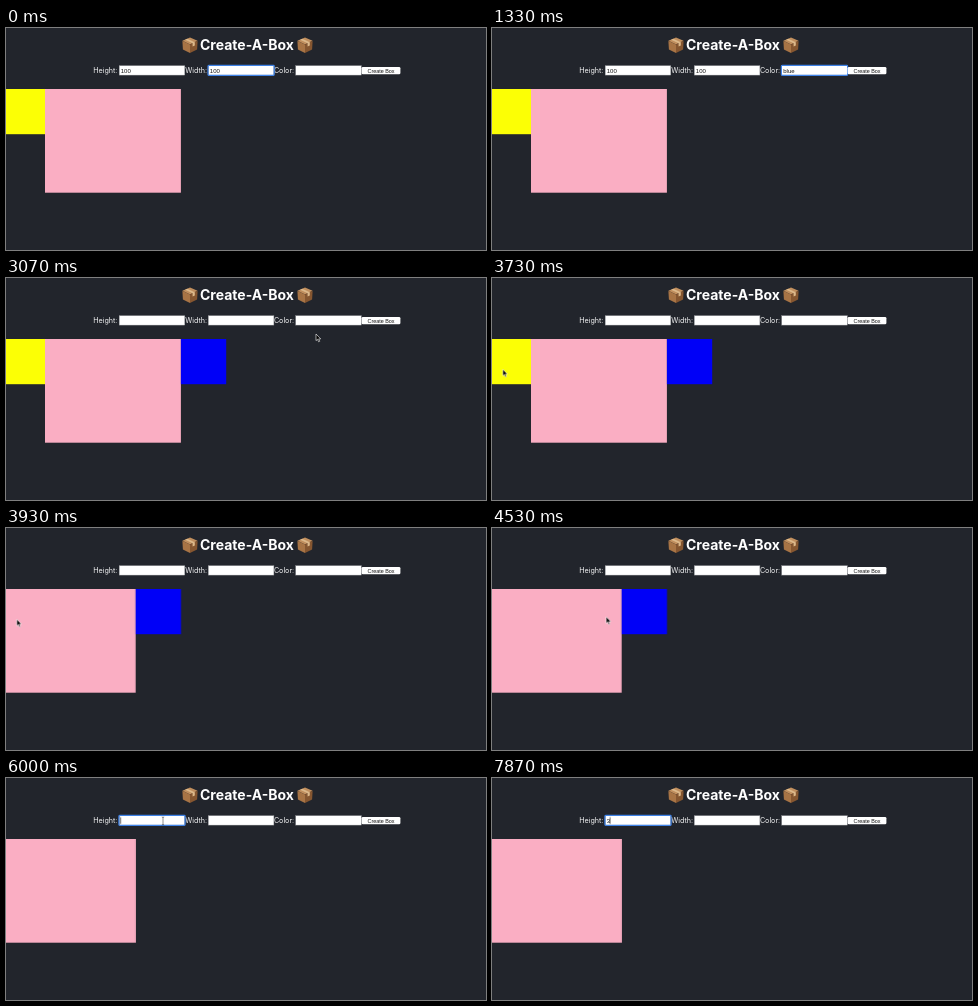
Recreate the animation shown at these times as an HTML page. Size 480 by 222 pixels, loop 8 s.

```html
<!DOCTYPE html>
<html lang="en">
<head>
<meta charset="utf-8">
<title>Create-A-Box</title>
<style>
  html, body { margin: 0; width: 100%; height: 100%; overflow: hidden; background: #22252c; }
  svg { display: block; width: 100vw; height: 100vh; }
  text { white-space: pre; }
  .title { font: 700 14px Inter, "Open Sans", sans-serif; fill: #fff; text-anchor: middle; }
  .label { font: 400 7.15px Inter, "Open Sans", sans-serif; fill: #f4f4f5; }
  .value { font: 6.04px "Liberation Sans", Arial, sans-serif; fill: #111; }
  .caption { font: 5.4px "Liberation Sans", Arial, sans-serif; fill: #111; text-anchor: middle; }
  .field { fill: #fff; stroke: #8b8d92; stroke-width: .4; }
  .ring { fill: none; stroke: #3f82e6; stroke-width: 1.2; }
  .caret { fill: #111; }

  /* Everything shares one 8 s clock; 1% = 80 ms */
  .a { animation: 8s step-end infinite; }
  .width-focus { animation-name: widthFocus; }
  .color-focus { animation-name: colorFocus; }
  .height-focus { animation-name: heightFocus; }
  .filled { animation-name: filled; }
  .b { animation-name: typeB; }
  .l { animation-name: typeL; }
  .u { animation-name: typeU; }
  .e { animation-name: typeE; }
  .digit { animation-name: digit; }
  .color-caret { animation-name: colorCaret; }
  .height-caret { animation-name: heightCaret; }
  .pressed { animation-name: pressed; }
  .yellow { animation-name: yellow; }
  .blue { animation-name: blue; }
  .row { animation-name: row; }
  .arrow { animation-name: arrow, travel; }
  .beam { animation-name: beam; }

  @keyframes widthFocus { 0% { visibility: visible } .87%, 100% { visibility: hidden } }
  @keyframes colorFocus { 0% { visibility: hidden } .87% { visibility: visible } 28.3%, 100% { visibility: hidden } }
  @keyframes heightFocus { 0% { visibility: hidden } 74.9%, 100% { visibility: visible } }
  @keyframes filled { 0% { visibility: visible } 30.87%, 100% { visibility: hidden } }
  @keyframes typeB { 0% { visibility: hidden } 10% { visibility: visible } 30.87%, 100% { visibility: hidden } }
  @keyframes typeL { 0% { visibility: hidden } 11.37% { visibility: visible } 30.87%, 100% { visibility: hidden } }
  @keyframes typeU { 0% { visibility: hidden } 12.75% { visibility: visible } 30.87%, 100% { visibility: hidden } }
  @keyframes typeE { 0% { visibility: hidden } 14.1% { visibility: visible } 30.87%, 100% { visibility: hidden } }
  @keyframes digit { 0% { visibility: hidden } 97.5%, 100% { visibility: visible } }
  @keyframes colorCaret {
    0% { visibility: hidden; transform: none }
    2.5% { visibility: visible; transform: none }
    10% { visibility: visible; transform: translateX(3.4px) }
    11.37% { visibility: visible; transform: translateX(4.7px) }
    12.75% { visibility: visible; transform: translateX(8.1px) }
    14.1% { visibility: visible; transform: translateX(11.4px) }
    16.6%, 100% { visibility: hidden; transform: translateX(11.4px) }
  }
  @keyframes heightCaret {
    0% { visibility: hidden; transform: none }
    74.9% { visibility: visible; transform: none }
    81.6% { visibility: hidden; transform: none }
    89.1% { visibility: visible; transform: none }
    96.6% { visibility: hidden; transform: none }
    98.3%, 100% { visibility: visible; transform: translateX(3.4px) }
  }
  @keyframes pressed { 0% { visibility: hidden } 28.3% { visibility: visible } 30.87%, 100% { visibility: hidden } }
  @keyframes yellow { 0% { visibility: visible } 49.1%, 100% { visibility: hidden } }
  @keyframes blue { 0% { visibility: hidden } 30.87% { visibility: visible } 63.3%, 100% { visibility: hidden } }
  @keyframes row { 0% { transform: none } 49.1%, 100% { transform: translateX(-45.3px) } }
  @keyframes arrow { 0% { visibility: hidden } 18.3% { visibility: visible } 74.1%, 100% { visibility: hidden } }
  @keyframes beam { 0% { visibility: hidden } 74.1% { visibility: visible } 97.5%, 100% { visibility: hidden } }

  /* Pointer moves in jumps of about 67 ms */
  @keyframes travel {
    0%, 17.5% { transform: translate(250px, 30px); animation-timing-function: steps(4) }
    20.83% { transform: translate(285px, 29px); animation-timing-function: steps(4) }
    24.17% { transform: translate(345px, 33px); animation-timing-function: steps(4) }
    27.5%, 35% { transform: translate(372.3px, 40.2px); animation-timing-function: steps(4) }
    38.35% { transform: translate(310px, 56px); animation-timing-function: steps(4) }
    41.68% { transform: translate(170px, 80px); animation-timing-function: steps(5) }
    45.85% { transform: translate(31px, 97px); animation-timing-function: steps(1) }
    46.6%, 50.77% { transform: translate(10.8px, 91.3px); animation-timing-function: steps(7) }
    56.6% { transform: translate(114.2px, 88.7px); animation-timing-function: steps(5) }
    60.85%, 67.5% { transform: translate(160.4px, 87.2px); animation-timing-function: steps(4) }
    70.83% { transform: translate(173px, 64px); animation-timing-function: steps(4) }
    74.1%, 100% { transform: translate(157px, 43px) }
  }
</style>
</head>
<body>
<svg viewBox="0 0 480 222">
  <defs>
    <linearGradient id="press" x2="0" y2="1">
      <stop stop-color="#2f78f6"/>
      <stop offset="1" stop-color="#0d52de"/>
    </linearGradient>
    <g id="parcel">
      <path d="M8 .4 15.6 3.6 8 7.2 .4 3.6Z" fill="#c18f5e"/>
      <path d="M.4 3.6 8 7.2V15.8L.9 12.3Z" fill="#a87445"/>
      <path d="M15.6 3.6 8 7.2V15.8L15.1 12.3Z" fill="#855630"/>
      <path d="M5.2 1.6 12.8 5V8.3L10.6 9.3V6L3.1 2.5Z" fill="#dcb88a"/>
    </g>
    <rect id="ring" class="ring" x="-.3" y="-.3" width="66.2" height="10" rx=".8"/>
    <rect id="field" class="field" width="65.6" height="9.4"/>
  </defs>

  <use href="#parcel" x="176" y="9.2"/>
  <text class="title" x="241" y="22.4">Create-A-Box</text>
  <use href="#parcel" x="291" y="9.2"/>

  <text class="label" x="87.2" y="44.5">Height:</text>
  <text class="label" x="179.2" y="44.5">Width:</text>
  <text class="label" x="267.9" y="44.5">Color:</text>

  <g transform="translate(113.2 37.7)">
    <use href="#field"/>
    <use href="#ring" class="a height-focus"/>
    <text class="value a filled" x="1.5" y="6.9">100</text>
    <text class="value a digit" x="1.5" y="6.9">3</text>
    <rect class="caret a height-caret" x="1.4" y="1.5" width=".6" height="6.6"/>
  </g>
  <g transform="translate(202.3 37.7)">
    <use href="#field"/>
    <use href="#ring" class="a width-focus"/>
    <text class="value a filled" x="1.5" y="6.9">100</text>
  </g>
  <g transform="translate(289.7 37.7)">
    <use href="#field"/>
    <use href="#ring" class="a color-focus"/>
    <text class="value" x="1.5" y="6.9"><tspan class="a b">b</tspan><tspan class="a l">l</tspan><tspan class="a u">u</tspan><tspan class="a e">e</tspan></text>
    <rect class="caret a color-caret" x="1.4" y="1.5" width=".6" height="6.6"/>
  </g>

  <rect x="355.6" y="38.9" width="38.8" height="7.4" rx="1.4" fill="#fff"/>
  <rect class="a pressed" x="355.6" y="38.9" width="38.8" height="7.4" rx="1.4" fill="url(#press)"/>
  <text class="caption" x="375" y="44.5">Create Box</text>

  <rect class="a yellow" x="-6.3" y="61" width="45.3" height="45.2" fill="#fcff05"/>
  <g class="a row">
    <rect x="39" y="61" width="135.9" height="103.7" fill="#faaec3"/>
    <rect class="a blue" x="174.9" y="61" width="45.3" height="45.2" fill="#0000f7"/>
  </g>

  <path class="a arrow" d="M0 0V6.6L1.5 5.3 2.6 7.8 3.7 7.3 2.6 4.9H4.7Z" fill="#000" stroke="#fff" stroke-width=".6"/>
  <path class="a beam" d="M155.8 38.9Q157 38.9 157 39.8V46.2Q157 47.1 155.8 47.1M158.2 38.9Q157 38.9 157 39.8M157 46.2Q157 47.1 158.2 47.1" fill="none" stroke="#222" stroke-width=".5"/>
</svg>
</body>
</html>
```
